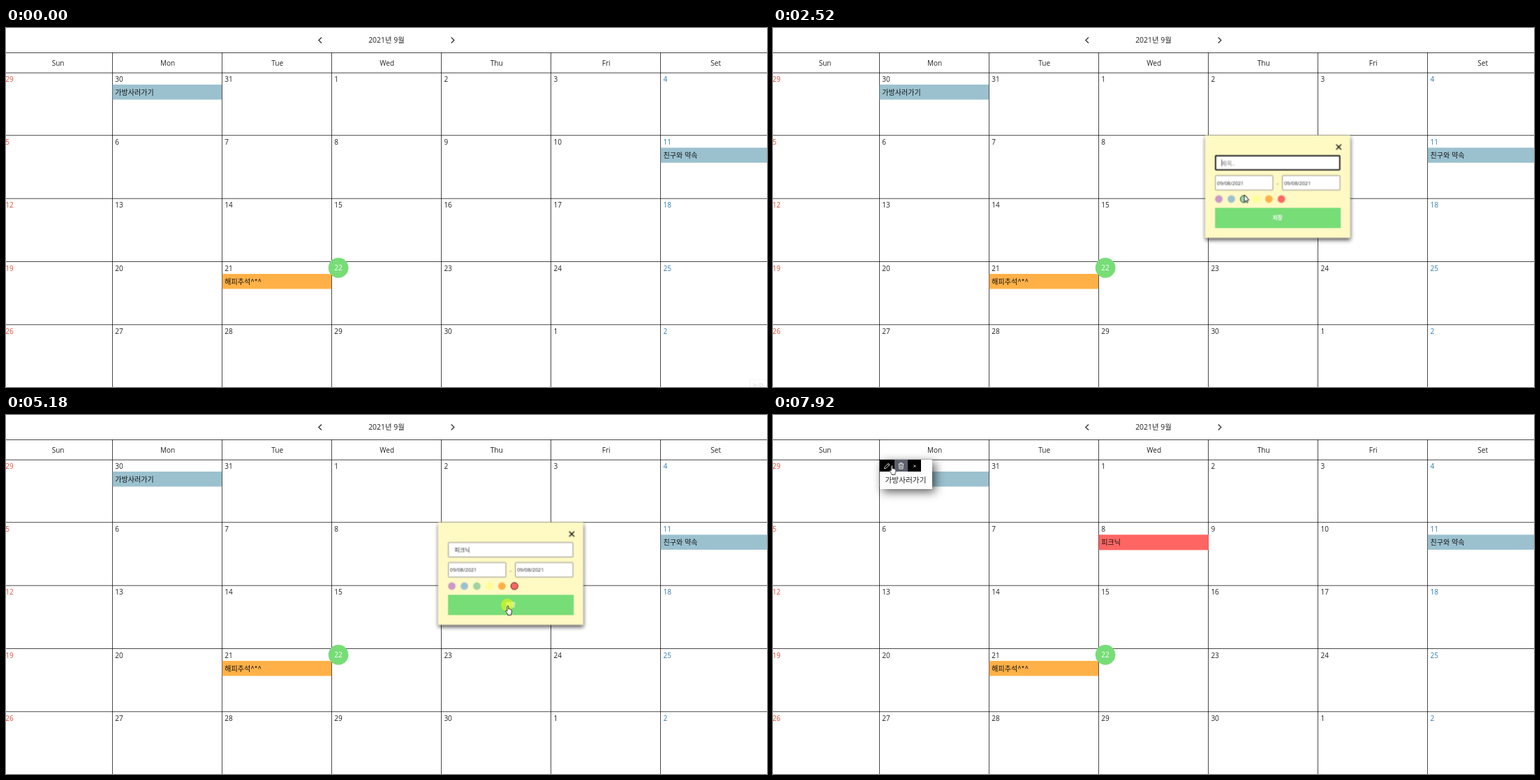
Animation, 1090 px wide and 514 px high, one loop 8 s. Source, as an HTML page:

```html
<!DOCTYPE html>
<html lang="ko">
<head>
<meta charset="utf-8">
<title>Calendar</title>
<style>
  html, body { margin: 0; width: 1090px; height: 514px; overflow: hidden; background: #fff; }
  body {
    position: relative;
    font: 14px/20px "Open Sans", "Noto Sans CJK KR", "Noto Sans CJK", sans-serif;
    color: #222;
    white-space: nowrap;
  }
  body * { box-sizing: border-box; }
  div, svg { position: absolute; }
  svg { overflow: visible; fill: none; }
  .ko { font-family: "Noto Sans CJK KR", "Noto Sans CJK", "Open Sans", sans-serif; }

  /* the calendar is laid out at full size and shown at 71.7% */
  .page { left: 0; top: 0; width: 1520px; height: 717px; transform: scale(.717); transform-origin: 0 0; }
  .line { background: #000; }
  .head { width: 100px; text-align: center; }
  .sun { color: #e8513d; }
  .sat { color: #2f7fb5; }
  .event { width: 218px; height: 30px; padding-left: 5px; line-height: 30px; color: #111; }
  .today { left: 644px; top: 459px; width: 40px; height: 40px; border-radius: 50%; background: #77dd77; color: #fff; line-height: 40px; padding-left: 12px; }

  /* every part runs on the same 8 s clock; 1% = 80 ms */
  .t { animation: 8s step-end infinite; }

  .corner { left: 1485px; top: 701px; width: 42px; height: 28px; border: 1px solid #e4e4e4; color: #ddd; padding: 3px 5px; font-size: 12.5px; animation-name: corner; }
  @keyframes corner { 0% { opacity: 1 } 1.25%, 100% { opacity: 0 } }

  .form { left: 863px; top: 214px; width: 290px; height: 205px; background: #fff9c4; box-shadow: 0 4px 8px rgba(0,0,0,.65); font-size: 10px; animation-name: form; }
  @keyframes form { 0% { opacity: 0 } 21% { opacity: 1 } 66.25%, 100% { opacity: 0 } }

  .box { background: #fff; border: 1px solid #666; border-radius: 2px; height: 30px; line-height: 28px; }
  .date { top: 80px; width: 116px; padding-left: 3px; }
  .title { left: 20px; top: 40px; width: 250px; font-size: 11.2px; }
  .focus { left: 20px; top: 40px; width: 250px; height: 30px; border: 2px solid #000; border-radius: 2px; animation-name: focus; }
  @keyframes focus { 0%, 57%, 100% { opacity: 0 } 24.4% { opacity: 1 } }
  .hint { color: #777; left: 12px; top: 0; animation-name: hint; }
  @keyframes hint { 0% { opacity: 1 } 33.75%, 100% { opacity: 0 } }

  .typed { left: 12px; top: 7px; height: 14px; line-height: 14px; border-right: 1px solid transparent; animation-name: caret; }
  .typed::before { content: "피크닉"; animation: typing 8s step-end infinite; }
  @keyframes caret {
    0% { border-color: transparent; text-decoration: none }
    24.4% { border-color: #222; text-decoration: underline }
    57%, 100% { border-color: transparent; text-decoration: none }
  }
  @keyframes typing {
    0% { content: "" }
    33.75% { content: "ㅍ" }
    35.5% { content: "피" }
    37.5% { content: "핔" }
    39.25% { content: "피크" }
    41% { content: "피큰" }
    42.5% { content: "피크니" }
    44.5%, 100% { content: "피크닉" }
  }

  .dot { top: 120px; width: 15px; height: 15px; border-radius: 50%; }
  .ring { left: 20px; border: 1.5px solid #111; animation-name: ring; }
  @keyframes ring {
    0% { opacity: 0 }
    31.5% { opacity: 1; transform: translateX(50px) }
    46.1% { opacity: 1; transform: translateX(75px) }
    48.8% { opacity: 0 }
    50.6% { opacity: 1; transform: translateX(100px) }
    55%, 100% { opacity: 1; transform: translateX(125px) }
  }
  .save { left: 20px; top: 145px; width: 250px; height: 40px; background: #77dd77; color: #fff; font-weight: 700; font-size: 10.7px; line-height: 39px; text-align: center; }

  .added { animation-name: added; }
  @keyframes added { 0% { opacity: 0 } 66.25%, 100% { opacity: 1 } }

  .card { left: 153px; top: 64px; width: 75px; height: 41.5px; background: #fff; box-shadow: 4px 4px 14px rgba(0,0,0,.65); animation-name: card; }
  @keyframes card { 0% { opacity: 0 } 90%, 100% { opacity: 1 } }
  .tool { top: 0; height: 17px; background: #000; }
  .trash { left: 21px; width: 19px; animation-name: trash; }
  @keyframes trash { 0% { background: #000 } 96%, 100% { background: #5b606b } }
  .name { left: 7.5px; top: 19px; font-size: 10.7px; }

  .cursor { left: 0; top: 0; animation: path 8s linear infinite; }
  @keyframes path {
    0%, 1.25% { transform: translate(1066px, 496px) }
    10% { transform: translate(427px, 191px) }
    11.25% { transform: translate(437px, 193px) }
    18.125% { transform: translate(523px, 193px) }
    20.5% { transform: translate(524px, 193px) }
    22.25%, 23.6% { transform: translate(640px, 196px) }
    24.4%, 26% { transform: translate(644px, 196px) }
    32.5%, 44% { transform: translate(680px, 246px) }
    52.5% { transform: translate(712px, 248px) }
    56.25%, 58.75% { transform: translate(728px, 246px) }
    63.125%, 66.25% { transform: translate(719px, 273px) }
    74.375%, 76.375% { transform: translate(565px, 185px) }
    85.75%, 90% { transform: translate(255px, 89px) }
    96.25% { transform: translate(185px, 74px) }
    99%, 100% { transform: translate(170.5px, 72px) }
  }
  .click { left: -10px; top: -10px; width: 18px; height: 18px; border-radius: 50%; background: rgba(255,255,0,.5); animation-name: click; }
  @keyframes click {
    0%, 21.4%, 26%, 58.75%, 66%, 89.4%, 100% { opacity: 0 }
    19.75%, 24.4%, 57%, 64%, 87.4% { opacity: 1 }
  }
  .arrow { animation-name: arrow; }
  .beam { animation-name: beam; }
  .hand { animation-name: hand; }
  @keyframes arrow {
    0%, 22.1%, 60.8%, 73.5%, 85%, 100% { opacity: 0 }
    1.25%, 27.2%, 66.25%, 77.7% { opacity: 1 }
  }
  @keyframes beam { 0%, 27.2%, 100% { opacity: 0 } 22.1% { opacity: 1 } }
  @keyframes hand {
    0%, 66.25%, 77.7% { opacity: 0 }
    60.8%, 73.5%, 85%, 100% { opacity: 1 }
  }
</style>
</head>
<body>
<svg width="1090" height="36" stroke="#222" stroke-width="1.1">
  <path d="M452 13.5l-4.2 4 4.2 4M637.7 13.5l4.2 4-4.2 4"/>
</svg>

<div class="page">
  <div class="head" style="left:710px;top:14px;font-size:14.5px">2021년 9월</div>
  <div id="grid"></div>
  <div class="event ko" style="left:213px;top:113px;background:#9bc1cf">가방사러가기</div>
  <div class="event ko" style="left:1308px;top:239px;background:#9bc1cf">친구와 약속</div>
  <div class="event ko" style="left:432px;top:491px;background:#ffb147">해피추석^*^</div>
  <div class="event ko added t" style="left:651px;top:239px;background:#ff6663">피크닉</div>
  <div class="today">22</div>
  <div class="corner ko t">녹화</div>

  <div class="form t">
    <svg width="290" height="40" stroke="#111" stroke-width="2"><path d="M262 18.5l10 10m0-10l-10 10"/></svg>
    <div class="box title ko"><div class="hint t">제목..</div><div class="typed t"></div></div>
    <div class="focus t"></div>
    <div class="box date" style="left:20px">09/08/2021</div>
    <div style="left:143px;top:86px">-</div>
    <div class="box date" style="left:154px">09/08/2021</div>
    <div id="dots"></div>
    <div class="dot ring t"></div>
    <div class="save ko">저장</div>
  </div>
</div>

<div class="card t">
  <div class="tool" style="left:0;width:21px"></div>
  <div class="tool trash t"></div>
  <div class="tool" style="left:40px;width:19px"></div>
  <svg width="60" height="17" stroke="#fff" stroke-width=".8">
    <path d="M6.5 12.8l.7-2.6 5-5 1.9 1.9-5 5zM11 6.3l1.9 1.9"/>
    <path d="M26.6 6.2h7.8M29 6v-1.3h3V6M27.5 6.4l.5 6.6h5l.5-6.6M29.5 7.8v3.8M31.5 7.8v3.8"/>
    <path d="M48.4 7.7l3 3m0-3l-3 3"/>
  </svg>
  <div class="name ko">가방사러가기</div>
</div>

<div class="cursor">
  <div class="click t"></div>
  <svg class="arrow t" width="10" height="14" stroke="#222" stroke-width=".9">
    <path fill="#fff" d="M.5 .5v10l2.3-2 1.5 3.3 1.6-.7-1.5-3.2h3z"/>
  </svg>
  <svg class="beam t" width="6" height="12" stroke="#222" stroke-width=".9">
    <path d="M-2.3-4.5h1.5l.8.7.8-.7h1.5M0-3.8v8M-2.3 5h1.5l.8-.7.8.7h1.5"/>
  </svg>
  <svg class="hand t" width="10" height="14" stroke="#222" stroke-width=".9" stroke-linejoin="round">
    <path fill="#fff" d="M-1.2 8V1.2q0-1.1 1-1.1t1 1.1v3.6q1-.6 1.6.3 1-.4 1.5.5 1.4-.2 1.4 1.1v3.2l-1 2.2v1.4h-4.7v-1.3l-2.9-3.7q-.5-1.3.6-1.4z"/>
  </svg>
</div>

<script>
  const COL = 219, ROW = 126;

  const add = (parent, cls, css, text = "") => {
    const el = document.createElement("div");
    el.className = cls;
    el.style.cssText = css;
    el.textContent = text;
    parent.append(el);
  };

  const grid = document.getElementById("grid");
  const colX = col => 212 + COL * (col - 1);

  const rows = [1, 2, 3, 4].map(row => 88 + ROW * row);
  [49, 89, ...rows].forEach(y => add(grid, "line", `left:0;top:${y}px;width:1521px;height:1px`));
  ["Sun", "Mon", "Tue", "Wed", "Thu", "Fri", "Set"].forEach((name, col) => {
    if (col) add(grid, "line", `left:${colX(col)}px;top:49px;width:1px;height:668px`);
    add(grid, "head", `left:${54 + COL * col}px;top:60px`, name);
  });

  for (let i = 0; i < 35; i++) {
    const col = i % 7, row = Math.floor(i / 7);
    const day = new Date(2021, 7, 29 + i).getDate();
    const cls = col === 0 ? "sun" : col === 6 ? "sat" : "";
    if (day !== 22) add(grid, cls, `left:${col ? colX(col) + 6 : -1}px;top:${92 + ROW * row}px`, day);
  }

  const dots = document.getElementById("dots");
  ["#cb99c9", "#9bc1cf", "#9fd3a0", "#fdfd96", "#ffb147", "#ff6663"].forEach((color, i) =>
    add(dots, "dot", `left:${20 + 25 * i}px;background:${color}`));
</script>
</body>
</html>
```
